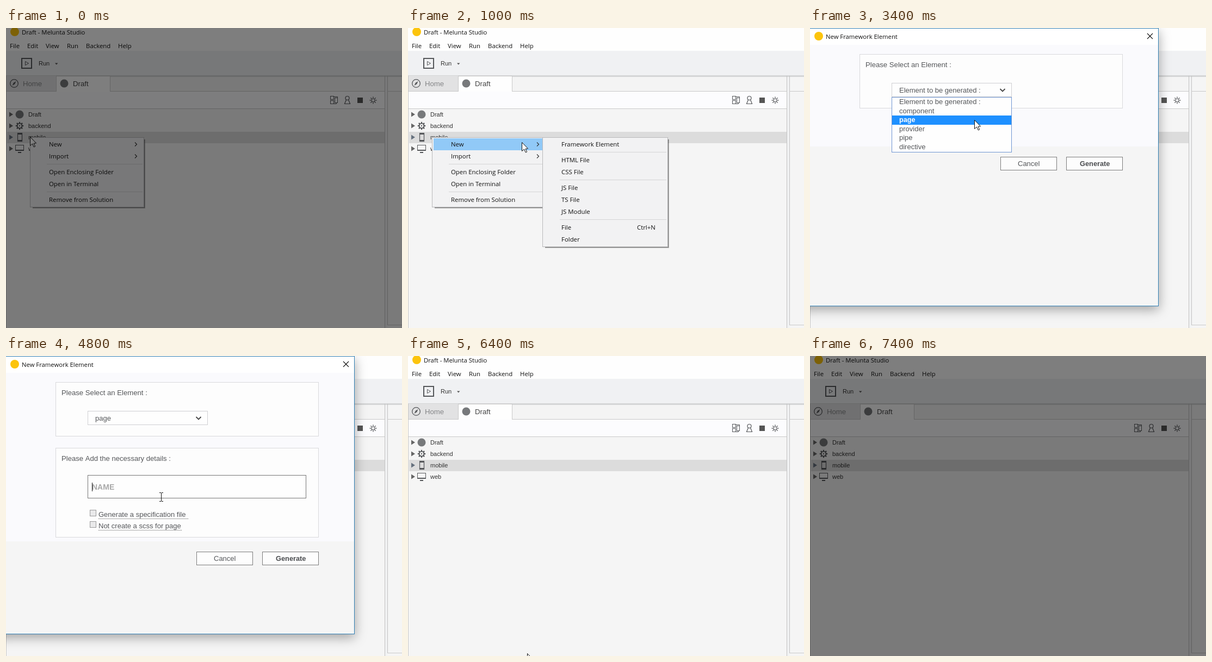
An HTML page with a canvas that plays this animation: 728x552 px, repeating every 7.6 s.

```html
<!DOCTYPE html>
<html lang="en">
<head>
<meta charset="utf-8">
<title>Creating a page</title>
<style>
html, body { margin: 0; width: 100%; height: 100%; overflow: hidden; background: #fff; }
canvas { display: block; }
</style>
</head>
<body>
<canvas id="stage" width="728" height="552"></canvas>
<script>
const ctx = document.getElementById('stage').getContext('2d');
const W = 728, H = 552, LOOP = 7600, STEP = 200;
const UI = '"Open Sans", "Noto Sans", sans-serif';
const ARIAL = '"Liberation Sans", Arial, sans-serif';
const APP = 'Draft', TITLE = APP + ' - Melunta Studio';
const YELLOW = '#fcc40d', INK = '#55575a', LINE = '#c9c9c9';

// time, x, y of the pointer's hot spot
const POINTER = [
  [0, 44, 200], [200, 44, 200], [400, 92, 205], [800, 196, 210], [1000, 209, 210],
  [1200, 272, 210], [2000, 272, 210], [2400, 338, 122], [2600, 346, 113], [2800, 346, 113],
  [3200, 308, 158], [3400, 302, 169], [3600, 302, 169], [4000, 288, 235], [4200, 285, 250],
  [4400, 285, 259], [5200, 285, 259], [5800, 520, 370], [6000, 520, 370],
  [6400, 219, 547], [6600, 190, 562]
];

function pointerAt(t) {
  const next = POINTER.findIndex(k => k[0] > t);
  if (next < 0) return POINTER[POINTER.length - 1].slice(1);
  const a = POINTER[next - 1], b = POINTER[next];
  const p = (t - a[0]) / (b[0] - a[0]);
  return [1, 2].map(i => Math.round(a[i] + (b[i] - a[i]) * p));
}

function rect(x, y, w, h, fill) {
  ctx.fillStyle = fill;
  ctx.fillRect(x, y, w, h);
}

function box(x, y, w, h, fill, stroke) {
  rect(x, y, w, h, stroke);
  rect(x + 1, y + 1, w - 2, h - 2, fill);
}

function text(s, x, y, size, color = '#111', family = UI, weight = '') {
  ctx.font = `${weight} ${size}px ${family}`;
  ctx.fillStyle = color;
  ctx.fillText(s, x, y);
}

const arial = (s, x, y, size = 13, color = INK, weight = '') =>
  text(s, x, y, size, color, ARIAL, weight);

function tracePath(points, closed) {
  ctx.beginPath();
  points.forEach(([x, y]) => ctx.lineTo(x, y));
  if (closed) ctx.closePath();
}

function line(points, color = INK, width = 1, closed = false) {
  tracePath(points, closed);
  ctx.strokeStyle = color;
  ctx.lineWidth = width;
  ctx.stroke();
}

function shape(points, fill) {
  tracePath(points, true);
  ctx.fillStyle = fill;
  ctx.fill();
}

function disc(x, y, r, fill) {
  ctx.beginPath();
  ctx.arc(x, y, r, 0, 7);
  ctx.fillStyle = fill;
  ctx.fill();
}

function ring(x, y, r, color = INK, width = 1.3) {
  ctx.beginPath();
  ctx.arc(x, y, r, 0, 7);
  ctx.strokeStyle = color;
  ctx.lineWidth = width;
  ctx.stroke();
}

function gear(x, y, inner, outer, hole, width) {
  for (let i = 0; i < 8; i++) {
    const c = Math.cos(i * Math.PI / 4), s = Math.sin(i * Math.PI / 4);
    line([[x + c * inner, y + s * inner], [x + c * outer, y + s * outer]], INK, width);
  }
  ring(x, y, hole, INK, width * .8);
}

function frameIcon(x, y, w, h, width = 1) {
  ctx.strokeStyle = INK;
  ctx.lineWidth = width;
  ctx.strokeRect(x, y, w, h);
}

function drawToolbarIcons() {
  frameIcon(596.5, 125.5, 6, 6);
  frameIcon(596.5, 133.5, 6, 6);
  frameIcon(604.5, 128.5, 5, 9);
  line([[603, 126.5], [609.5, 126.5], [609.5, 129]]);
  line([[603, 139.5], [607.5, 139.5], [607.5, 137]]);
  ring(627.5, 129, 3.5, INK, 1.2);
  line([[625.5, 132], [622.5, 139.5], [632.5, 139.5], [629.5, 132]], INK, 1.2);
  rect(646, 128, 10, 10, '#555');
  gear(675, 133, 4, 6.5, 3, 1.3);
}

function drawTree() {
  rect(2, 191, 694, 21, '#dcdcdc');
  [APP, 'backend', 'mobile', 'web'].forEach((label, i) => {
    const y = 159 + i * 21;
    shape([[6, y - 4.5], [13, y], [6, y + 4.5]], i === 2 ? '#66717e' : '#666');
    arial(label, 41, y + 4, 11, '#333');
  });
  disc(25, 159, 7.5, '#77797b');
  gear(25, 180, 4.5, 7.2, 4.3, 2.3);
  disc(25, 180, 1.2, INK);
  frameIcon(21.5, 193.5, 8, 15, 1.2);
  rect(21, 193, 9, 3, INK);
  rect(21, 206, 9, 3, INK);
  frameIcon(17.5, 215.5, 15, 10);
  rect(17, 224, 16, 2, INK);
  rect(22, 228, 6, 2, INK);
}

function drawWindow() {
  rect(0, 0, W, H, '#f5f5f5');
  rect(0, 0, W, 42, '#fefefe');
  disc(16, 7, 8, YELLOW);
  text(TITLE, 29, 12, 11.3);
  [['File', 7], ['Edit', 39], ['View', 73], ['Run', 112], ['Backend', 147], ['Help', 206]]
    .forEach(([s, x]) => text(s, x, 37, 11.4));

  rect(0, 42, W, 46, '#f0f1f3');
  frameIcon(29, 56, 18, 18, 2);
  line([[35.5, 61.5], [41.5, 65], [35.5, 68.5]], INK, 1, true);
  arial('Run', 60, 69, 11, '#333');
  shape([[90, 64.5], [95.5, 64.5], [92.7, 67.5]], '#555');

  rect(0, 87, W, 3, '#d4d5d6');
  rect(0, 90, 697, 27, '#f4f4f4');
  rect(1, 88, 92, 29, '#e2e2e3');
  rect(0, 116, 697, 1, LINE);
  rect(92, 88, 100, 29, LINE);
  rect(93, 89, 98, 28, '#fefefe');
  ring(15, 102, 7.3);
  shape([[18.5, 98], [16.2, 103.2], [11.5, 106], [13.8, 100.8]], INK);
  arial('Home', 31, 107, 13.2, '#858688');
  disc(107, 102, 7.5, '#77797b');
  arial(APP, 123, 107, 13.2, '#444');

  rect(1, 117, 695, 31, '#fcfcfe');
  rect(0, 148, 697, 1, LINE);
  drawToolbarIcons();
  drawTree();

  rect(0, 88, 1, H - 88, LINE);
  rect(696, 88, 1, H - 88, '#c2c2c2');
  rect(697, 90, 4, H - 90, '#f1f2f3');
  rect(701, 88, 1, 459, '#c2c2c2');
  rect(701, 116, 27, 1, LINE);
  rect(701, 546, 27, 1, LINE);
}

function panel(x, y, w, h) {
  rect(x + 5, y + 4, w - 3, h - 2, 'rgba(0,0,0,.25)');
  rect(x + 5, y + 4, w - 4, h - 3, 'rgba(0,0,0,.3)');
  box(x, y, w, h, '#f2f2f3', '#b9b9bb');
}

function drawMenu(hoverNew) {
  panel(44, 201, 210, 129);
  if (hoverNew) rect(47, 203, 204, 22, '#91c9f7');
  [['New', 218], ['Import', 240], ['Open Enclosing Folder', 269],
    ['Open in Terminal', 291], ['Remove from Solution', 320]]
    .forEach(([s, y]) => text(s, 79, y, 11.4));
  [250, 301].forEach(y => rect(75, y, 176, 1, '#d5d5d6'));
  [214, 236].forEach(y => line([[237, y - 3.5], [240.5, y], [237, y + 3.5]], '#333', 1.1));
}

function drawSubmenu(hoverFirst) {
  panel(247, 201, 231, 202);
  if (hoverFirst) rect(250, 203, 225, 22, '#91c9f7');
  [['Framework Element', 218], ['HTML File', 247], ['CSS File', 269], ['JS File', 298],
    ['TS File', 320], ['JS Module', 342], ['File', 371], ['Folder', 393]]
    .forEach(([s, y]) => text(s, 282, y, 11.4));
  [228, 279, 352].forEach(y => rect(279, y, 196, 1, '#d5d5d6'));
  text('Ctrl+N', 421, 371, 11.4);
}

function drawButtons(y) {
  box(350, y, 104, 25, '#fdfdfd', '#7c7c7c');
  arial('Cancel', 382, y + 17);
  box(471, y, 104, 25, '#fdfdfd', '#7c7c7c');
  arial('Generate', 496, y + 17, 12.8, '#4b4d50', 'bold');
}

function drawDetails(focused) {
  box(91, 169, 484, 165, '#fdfdfd', '#d9d9dc');
  arial('Please Add the necessary details :', 102, 193, 13.1);
  box(150, 219, 402, 43, '#fefefe', '#777');
  arial('NAME', 158, 246, 14, '#a9a9a9', 'bold');
  if (focused) rect(158, 233, 1, 16, '#111');
  [['Generate a specification file', 296, 335], ['Not create a scss for page', 317, 324]]
    .forEach(([s, y, end]) => {
      box(154, y - 13, 12, 12, '#e9e9ea', '#9a9a9a');
      arial(s, 170, y);
      for (let x = 170; x < end; x += 2) rect(x, y + 3, 1, 1, '#555');
    });
}

function drawOptions(hover) {
  box(150, 127, 221, 102, '#fefefe', '#6f95d2');
  ['Element to be generated :', 'component', 'page', 'provider', 'pipe', 'directive']
    .forEach((s, i) => {
      const y = 140 + Math.round(i * 16.6), active = i === hover;
      if (active) rect(151, y - 12, 219, 17, '#1e90ff');
      if (active) arial(s, 164, y, 12.6, '#fff', 'bold');
      else arial(s, 164, y);
    });
}

function drawDialog(t) {
  const chosen = t >= 3600;
  ctx.save();
  ctx.shadowColor = 'rgba(0,0,0,.35)';
  ctx.shadowBlur = 20;
  ctx.shadowOffsetY = 6;
  rect(-20, 0, 661, 512, '#2f7fb4');
  ctx.restore();
  rect(0, 1, 640, 510, '#f5f5f5');
  rect(0, 1, 640, 30, '#fff');
  disc(16, 15, 8, YELLOW);
  text('New Framework Element', 29, 20, 11.3);
  line([[620, 10], [630, 20]], '#111', 1.1);
  line([[630, 10], [620, 20]], '#111', 1.1);
  if (t < 1800) return;

  rect(0, 31, 640, chosen ? 310 : 187, '#fafafd');
  box(91, 48, 484, 100, '#fdfdfd', '#d9d9dc');
  arial('Please Select an Element :', 102, 72, 13.15);
  box(150, 101, 221, 26, '#fefefe', '#cfcfd2');
  arial(chosen ? 'page' : 'Element to be generated :', 164, 119);
  line([[349.5, 112], [354, 116.5], [358.5, 112]], '#444', 1.8);
  if (chosen) drawDetails(t >= 4400);
  drawButtons(chosen ? 360 : 237);
  if (t >= 2600 && !chosen) drawOptions(t < 3000 ? 0 : t < 3400 ? 1 : 2);
}

function drawArrow(x, y) {
  const points = [[0, 0], [0, 16], [4, 12.5], [6.8, 18.5], [9.2, 17.4], [6.5, 11.8], [11, 11.4]]
    .map(([dx, dy]) => [x + .5 + dx, y + .5 + dy]);
  shape(points, '#fff');
  line(points, '#111', 1, true);
}

function drawBeam(x, y) {
  rect(x, y - 7, 1, 15, '#111');
  [-8, 8].forEach(d => {
    rect(x - 3, y + d, 3, 1, '#111');
    rect(x + 1, y + d, 3, 1, '#111');
  });
}

function shade(t) {
  if (t >= 7400 || t < 200) return .5;
  return t >= 7200 || t < 400 ? .25 : 0;
}

function draw(t) {
  drawWindow();
  if (t < 1400) drawMenu(t >= 400);
  if (t >= 1000 && t < 1400) drawSubmenu(t >= 1200);
  if (t >= 1600 && t < 6200) drawDialog(t);

  const [x, y] = pointerAt(t);
  if (t >= 4000 && t < 5400) drawBeam(x, y);
  else drawArrow(x, y);
  rect(0, 0, W, H, `rgba(0,0,0,${shade(t)})`);
}

function tick() {
  const t = performance.now() % LOOP;
  draw(Math.floor(t / STEP) * STEP);
  requestAnimationFrame(tick);
}
tick();
</script>
</body>
</html>
```
